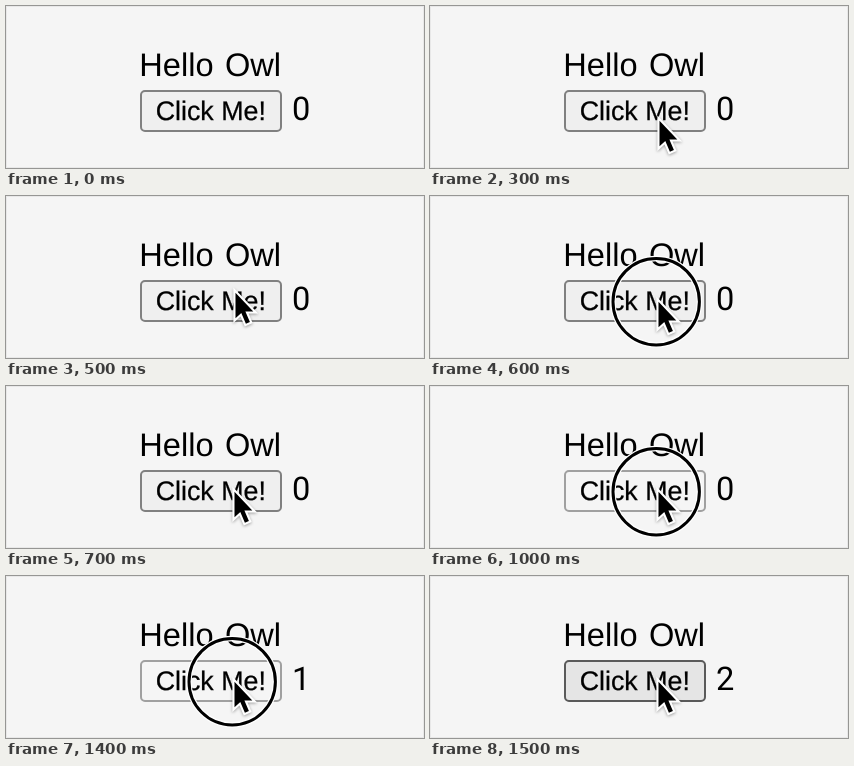
These frames come from a looping animation (418x162 px, 1800 ms). An HTML page:

```html
<!DOCTYPE html>
<html lang="en">
<head>
<meta charset="utf-8">
<title>Click counter</title>
<style>
  html, body { margin: 0; width: 100%; height: 100%; overflow: hidden; background: #f5f5f5; }
  svg { display: block; width: 418px; height: 162px; }
  text { font-family: "Liberation Sans", Arial, sans-serif; font-size: 32.6px; text-rendering: geometricPrecision; }
  .title { word-spacing: 2.4px; }
  .label { font-size: 26.8px; stroke: #000; stroke-width: .25px; }
  #count { font-family: Roboto, sans-serif; }
  #cursor { filter: drop-shadow(0 1.5px 1.5px rgba(0, 0, 0, .35)); }
</style>
</head>
<body>
<svg viewBox="0 0 418 162">
  <rect width="418" height="162" fill="#f5f5f5"/>
  <rect x=".5" y=".5" width="417" height="161" fill="none" stroke="#e8e8e8"/>
  <text class="title" x="133.3" y="69.7">Hello Owl</text>
  <rect id="button" x="135" y="85" width="140" height="40" rx="4" stroke-width="2"/>
  <text class="label" x="149.7" y="114">Click Me!</text>
  <text id="count" x="286" y="114.3">0</text>
  <g id="ring" fill="none">
    <circle cx="226.2" cy="105.7" r="43.2" stroke="#fff" stroke-width="5.4"/>
    <circle cx="226.2" cy="105.7" r="43.2" stroke="#000" stroke-width="3"/>
  </g>
  <g id="cursor">
    <path d="M0 0V25.5L5.8 20.3L10.4 31L14.4 29.3L9.9 18.8H17.8Z"
          fill="#000" stroke="#fff" stroke-width="4.2" paint-order="stroke" stroke-linejoin="miter"/>
  </g>
</svg>
<script>
  const LOOP = 1800;
  const looks = {
    idle:   ["#efefef", "#808080"],
    hover:  ["#e5e5e5", "#5a5a5a"],
    active: ["#f5f5f5", "#a0a0a0"]
  };
  const rest = [228.5, 105.7];

  // start time, cursor position, ring shown, button look, count
  const steps = [
    [0,    null,           false, "idle",   0],
    [300,  [229.5, 114.7], false, "idle",   0],
    [400,  [229.5, 105.7], false, "idle",   0],
    [500,  [229.5, 96.7],  false, "idle",   0],
    [600,  rest,           true,  "idle",   0],
    [700,  rest,           false, "idle",   0],
    [1000, rest,           true,  "active", 0],
    [1100, rest,           false, "hover",  1],
    [1400, rest,           true,  "active", 1],
    [1500, rest,           false, "hover",  2]
  ];

  const [button, count, ring, cursor] =
    ["button", "count", "ring", "cursor"].map(id => document.getElementById(id));
  const show = (node, on) => node.setAttribute("visibility", on ? "visible" : "hidden");

  function draw(time) {
    const [, position, pressed, look, clicks] = steps.findLast(step => step[0] <= time);
    const [fill, border] = looks[look];
    button.setAttribute("fill", fill);
    button.setAttribute("stroke", border);
    count.textContent = clicks;
    show(ring, pressed);
    show(cursor, position);
    if (position) cursor.setAttribute("transform", `translate(${position})`);
  }

  const start = performance.now();
  function tick() {
    draw((performance.now() - start) % LOOP);
    requestAnimationFrame(tick);
  }
  tick();
</script>
</body>
</html>
```
